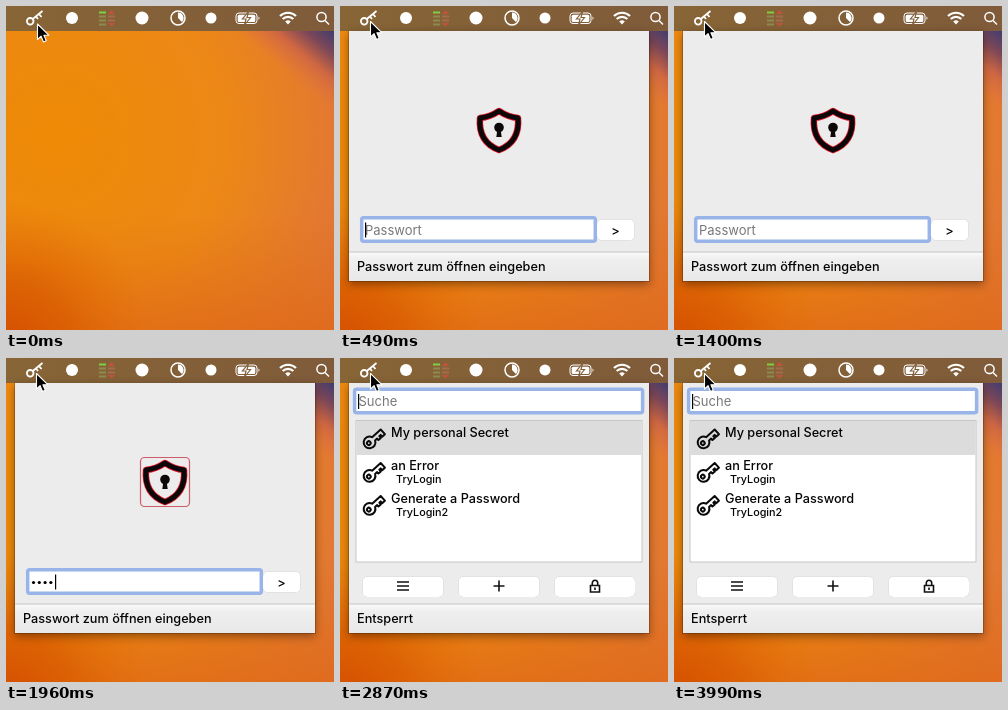
Recreate the animation shown at these times as an HTML page. Size 328 px wide and 324 px high, loop 4060 ms.

```html
<!DOCTYPE html>
<html lang="de">
<head>
<meta charset="utf-8">
<title>Passwort-Menü</title>
<style>
  html, body { margin: 0; width: 100%; height: 100%; overflow: hidden; }
  svg { display: block; width: 100%; height: 100%; }
  text { font: 500 12.7px Inter, sans-serif; fill: #050505; }
  .small { font-size: 10.8px; }
  .hint { font-weight: 400; font-size: 13px; fill: #787878; }
  .line { fill: none; stroke: #111; stroke-width: 1.6; }
  .white { fill: none; stroke: #fff; stroke-width: 1.5; }
  .field { fill: #fff; stroke: #98b4e9; stroke-width: 3.5; }
  .button { fill: #fff; filter: drop-shadow(0 .5px .6px #0005); }
  #window { filter: drop-shadow(0 3px 5px #0006); }
</style>
</head>
<body>
<svg viewBox="0 0 328 324">
  <defs>
    <radialGradient id="base" gradientUnits="userSpaceOnUse" cx="50" cy="130" r="340">
      <stop stop-color="#ee8a04"/><stop offset=".5" stop-color="#ec8816"/><stop offset="1" stop-color="#dd7040"/>
    </radialGradient>
    <radialGradient id="ember" gradientUnits="userSpaceOnUse" cx="0" cy="345" r="150">
      <stop stop-color="#d44c00"/><stop offset=".45" stop-color="#da5c00" stop-opacity=".8"/><stop offset="1" stop-color="#e27000" stop-opacity="0"/>
    </radialGradient>
    <linearGradient id="floor" x2="0" y2="1">
      <stop stop-color="#e2700c" stop-opacity="0"/><stop offset="1" stop-color="#e06a14" stop-opacity=".75"/>
    </linearGradient>
    <linearGradient id="dusk" gradientUnits="userSpaceOnUse" x1="287" y1="73" x2="328" y2="24">
      <stop stop-color="#df7440" stop-opacity="0"/><stop offset=".4" stop-color="#cf6742"/>
      <stop offset=".7" stop-color="#7c4758"/><stop offset="1" stop-color="#3d3c70"/>
    </linearGradient>
    <linearGradient id="bar">
      <stop stop-color="#876536"/><stop offset="1" stop-color="#7f5b3a"/>
    </linearGradient>
    <linearGradient id="status" x2="0" y2="1">
      <stop stop-color="#fafafa"/><stop offset=".25" stop-color="#efefef"/><stop offset="1" stop-color="#e8e8e8"/>
    </linearGradient>
    <g id="key" transform="rotate(-42) scale(.92)" fill="none" stroke="#0a0a0a" stroke-width="2.2" stroke-linejoin="round">
      <path d="M6-2.4H18.500V4.500H14.500V2H12.500V4.500H9V2.400H6A6.400 6.400 0 1 1 6-2.400Z"/>
      <circle cx="-1" r="2"/>
    </g>
    <path id="shield" d="M159 105Q168 111 178 112Q180 136 159 144Q138 136 140 112Q150 111 159 105Z" fill="none" stroke-linejoin="round"/>
  </defs>

  <rect width="328" height="324" fill="url(#base)"/>
  <rect y="210" width="328" height="114" fill="url(#floor)"/>
  <rect width="328" height="324" fill="url(#ember)"/>
  <rect x="220" width="108" height="140" fill="url(#dusk)"/>

  <g id="menubar">
    <rect width="328" height="25" fill="url(#bar)"/>
    <rect id="highlight" x="7" width="42" height="25" fill="#fff" opacity=".2"/>
    <circle class="white" cx="24.200" cy="15.300" r="3.300" style="stroke-width:1.800"/>
    <path class="white" d="M26.800 13L36.500 5M33 8l2.500 3M30 10.500l2 2.500" style="stroke-width:1.800"/>
    <g fill="#fff">
      <circle cx="66" cy="12" r="6"/><circle cx="136" cy="12" r="6.500"/><circle cx="205" cy="12" r="5.500"/>
    </g>
    <path d="M93 6.500h7" stroke="#7fd040" stroke-width="2"/>
    <path d="M93 10.500h7m-7 4h7m-7 4h7" stroke="#8f8a50" stroke-width="2"/>
    <path d="M102 10.500h7m-7 4h7" stroke="#a66a4c" stroke-width="2"/>
    <path d="M102 8l3.500-4 3.500 4zm0 9l3.500 3.500 3.500-3.500z" fill="#c0543c"/>
    <circle class="white" cx="172" cy="12" r="7"/>
    <path d="M172 12V6.500a5.500 5.500 0 0 1 3.900 9.400Z" fill="#fff"/>
    <rect class="white" x="230" y="7" width="21" height="10.500" rx="3" style="stroke-width:1"/>
    <rect x="231.700" y="8.700" width="17.600" height="7.200" rx="1.500" fill="#fff"/>
    <path d="M252.500 10.500q2 1.700 0 3.500z" fill="#fff"/>
    <path d="M242.500 5.500l-6 7.500h3.500l-1.500 6 6-7.500h-3.500z" fill="#fff" stroke="#80603a" stroke-width="1.200"/>
    <path class="white" d="M274 10a11.500 11.500 0 0 1 16 0M276.700 13a7.500 7.500 0 0 1 10.600 0" style="stroke-width:2.200"/>
    <path d="M282 18.500l-2.800-3a4 4 0 0 1 5.600 0z" fill="#fff"/>
    <circle class="white" cx="315.500" cy="11" r="4.600"/>
    <path class="white" d="M319 14.500l4 4"/>
  </g>

  <g id="window">
    <rect x="9" y="25" width="300" height="250" fill="#ececec"/>
    <rect x="9" y="246" width="300" height="29" fill="url(#status)"/>
    <path d="M9 246h300" stroke="#c4c4c4"/>
    <path d="M8.500 25V275.500H309.500V25" fill="none" stroke="#0003"/>

    <g id="login">
      <use href="#shield" stroke="#e01828" stroke-width="6.500"/>
      <use href="#shield" stroke="#0c0709" stroke-width="5"/>
      <circle cx="159" cy="121.500" r="4.800" fill="#0c0709"/>
      <path d="M157.500 123h3l1.200 8h-5.400z" fill="#0c0709"/>
      <rect id="ring" x="134.500" y="99.500" width="49" height="49" rx="4" fill="none" stroke="#c41428" stroke-width="1.200"/>
      <rect class="field" x="21.700" y="211.700" width="233.600" height="23.600" rx="2"/>
      <text id="prompt" class="hint" x="25" y="229">Passwort</text>
      <g id="dots"></g>
      <rect class="button" x="257" y="213.500" width="37.500" height="21" rx="5"/>
      <text x="275.500" y="228.500" text-anchor="middle">&gt;</text>
      <text x="17" y="264.500">Passwort zum öffnen eingeben</text>
    </g>

    <g id="vault">
      <rect class="field" x="14.600" y="31.200" width="288" height="23.600" rx="2"/>
      <text class="hint" x="18.500" y="48">Suche</text>
      <rect x="16" y="62.500" width="286" height="141.500" fill="#fff" stroke="#c6c6c6"/>
      <rect x="16.500" y="63" width="285" height="34" fill="#dcdcdc"/>
      <g id="keys"></g>
      <text x="51" y="79">My personal Secret</text>
      <text x="51" y="112">an Error</text>
      <text class="small" x="56" y="125">TryLogin</text>
      <text x="51" y="145">Generate a Password</text>
      <text class="small" x="56" y="158">TryLogin2</text>
      <rect class="button" x="22.500" y="218.500" width="81" height="20.500" rx="5"/>
      <rect class="button" x="118.500" y="218.500" width="81" height="20.500" rx="5"/>
      <rect class="button" x="214.500" y="218.500" width="80.500" height="20.500" rx="5"/>
      <path class="line" d="M57 224h12m-12 4h12m-12 4h12M153.500 228h11m-5.500-5.500v11"/>
      <path class="line" d="M250.500 227.500h9v6.500h-9zm1.800 0v-2.500a2.700 2.700 0 0 1 5.400 0v2.500M255 229.500v2.500"/>
      <text x="17" y="264.500">Entsperrt</text>
    </g>
    <rect id="caret" width="1.200" height="15"/>
  </g>

  <path id="pointer" d="M0 0V15.500L3.600 12.200 6 18 8.800 16.800 6.400 11.200H11.300Z" fill="#000" stroke="#fff" stroke-width="1.100" stroke-linejoin="round"/>
</svg>

<script>
const LOOP = 4060, TICK = 70;
const OPEN = 490, UNLOCK = 2870;
const KEYSTROKES = [1470, 1540, 1680, 1750];
const CARET_FADES = [[0, 1], [840, .7], [980, 0], [1470, 1], [3360, .5], [3430, 0], [3850, .3], [3920, .7], [3990, 1]];

const el = id => document.getElementById(id);
const clamp = v => Math.min(1, Math.max(0, v));
const show = (id, on) => el(id).setAttribute('visibility', on ? 'inherit' : 'hidden');
const place = (id, x, y) => el(id).setAttribute('transform', `translate(${x} ${y})`);

el('keys').innerHTML = [84.5, 118, 151].map(y => `<use href="#key" x="29.5" y="${y}"/>`).join('');
el('dots').innerHTML = KEYSTROKES.map((_, i) => `<circle cx="${27.5 + i * 5.8}" cy="224.5" r="1.6"/>`).join('');
const dots = [...el('dots').children];

function draw(now) {
  const t = Math.floor((now % LOOP) / TICK) * TICK;
  const typed = KEYSTROKES.filter(k => t >= k).length;
  const unlocked = t >= UNLOCK;

  show('highlight', t >= 420 && t < OPEN);
  show('window', t >= OPEN);
  show('login', !unlocked);
  show('vault', unlocked);
  show('prompt', typed === 0);
  dots.forEach((dot, i) => dot.setAttribute('opacity', i < typed ? 1 : 0));
  el('ring').setAttribute('opacity', clamp((t - 1820) / 210));

  if (unlocked) place('caret', 18, 36);
  else place('caret', 25 + typed * 6, 216.5);
  el('caret').setAttribute('opacity', CARET_FADES.findLast(([from]) => t >= from)[1]);

  const glide = clamp(t / 350);
  place('pointer', 31.5 - glide, 18 - 2.5 * glide);
  requestAnimationFrame(draw);
}
requestAnimationFrame(draw);
</script>
</body>
</html>
```
